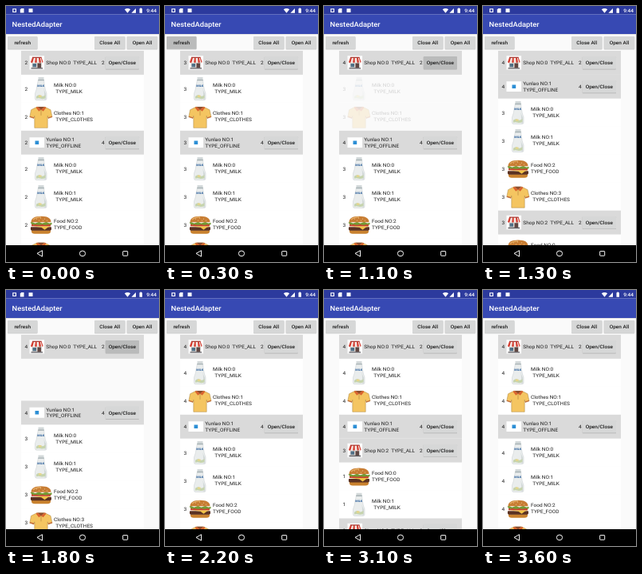
These frames come from a looping animation (192 by 320 pixels, 3700 ms). An HTML page:

```html
<!DOCTYPE html>
<html lang="en">
<head>
<meta charset="utf-8">
<title>NestedAdapter</title>
<style>
html, body { margin: 0; width: 100%; height: 100%; overflow: hidden; background: #fafafa; }
svg { display: block; width: 100%; height: 100%; }
text { font: 6.53px Roboto, sans-serif; fill: #1c1c1c; white-space: pre; text-rendering: geometricPrecision; }
.btn text { font-weight: 500; text-anchor: middle; }
.bar { font-weight: 500; fill: #fff; }
</style>
</head>
<body>
<!-- A 9:16 phone screen shown on a slightly shorter stage. -->
<svg viewBox="0 0 192 341.33" preserveAspectRatio="none" xmlns="http://www.w3.org/2000/svg">
  <defs>
    <clipPath id="view"><rect x="19" y="59.73" width="154" height="260"/></clipPath>
    <g id="shop">
      <path d="M29.500 6.600h18.600v18.600H29.500z" fill="#fcfcfc"/>
      <path d="M32.500 15h12.600v8H32.500z" fill="#d9d5d1"/>
      <path d="M33.500 17h4.500v4.500h-4.500z" fill="#4f6f86"/>
      <path d="M39.500 16.500h4.500V23h-4.500z" fill="#604743"/>
      <path d="M31.500 22.600h14.600V24H31.500z" fill="#5c5b60"/>
      <path d="M33 9h11.600l2 6q-1.300 2.400-2.600 0-1.300 2.400-2.600 0-1.300 2.400-2.600 0-1.300 2.400-2.600 0-1.300 2.400-2.600 0-1.300 2.400-2.600 0z" fill="#f5ebe6"/>
      <path d="M33 9h2l-1.400 6q-1.300 2.400-2.600 0zM37 9h1.600l.2 6q-1.300 2.400-2.600 0zM41 9h1.700l1.300 6q-1.300 2.400-2.600 0zM44.600 9l2 6-1 1-2-7z" fill="#d43d31"/>
      <path d="M33 8.300h11.600v1.300H33z" fill="#a93a33"/>
    </g>
    <g id="brand">
      <path d="M29.500 8.900h18.600v13.800H29.500z" fill="#fff"/>
      <path d="M36.500 13.500h4.700v4.700h-4.700z" fill="#2d8fd5"/>
    </g>
    <g id="milk">
      <path d="M40.500 7h7l.7 6q.8 7 2.800 12v7q0 2-2 2H38.500q-2 0-2-2v-7q2-5 2.800-12z" fill="#eaeded" stroke="#c6cccd" stroke-width=".5"/>
      <path d="M40.500 3.500h7V8h-7z" fill="#d3d9da"/>
      <path d="M40.200 6.500h7.600v1.500h-7.600z" fill="#a9b3b6"/>
      <path d="M47.500 18q.5 4 2.500 7.500V32q0 1.500-1.500 1.500z" fill="#d3d9d9"/>
      <path d="M38 29q3-3 5.500-1t6-1v4q-3 2-6 1T38 32z" fill="#c6d4ae"/>
      <path d="M41 27.500h3.500V30H41z" fill="#e5d68c"/>
      <text x="43.800" y="15.800" text-anchor="middle" style="font-size:3.800px;font-weight:700;fill:#245a98">MILK</text>
    </g>
    <g id="clothes" transform="scale(1 1.067)">
      <path d="M38.500 5.500L31.500 9 29.800 18l5.200 1.600.8-3.100V31.500h16.400V16.500l.8 3.100 5-1.600L56 9 49 5.500z" fill="#f4c561" stroke="#a9823f" stroke-width=".5"/>
      <path d="M30 16.800l5.300 1.500-.3 1.300-5.200-1.600zM57.800 16.800l-4.900 1.500.1 1.300 5-1.600z" fill="#c4683a"/>
      <path d="M39.500 5.200h8.800l-4.300 4.200z" fill="#8d4d2e"/>
      <path d="M39 5l-1.300 1.500 3.600 4.500 2.700-2.300zM49 5l1.300 1.500-3.600 4.500L44 8.700z" fill="#d9632f"/>
      <path d="M44 9v7" stroke="#b58640" stroke-width=".7"/>
    </g>
    <g id="food" transform="scale(1 1.067)">
      <path d="M32 24.500h24v1.500q0 3-4 3H36q-4 0-4-3z" fill="#c9822f"/>
      <path d="M31.200 20.500h25.600q1 4.500-2 4.500H33q-3 0-1.800-4.500z" fill="#5b3222"/>
      <path d="M32 19.500h24.500l-4 1.500-4 3-4-3z" fill="#f0c247"/>
      <path d="M32 16.500h24v3H32z" fill="#c9442f"/>
      <path d="M30.500 15q2-1.500 4 0t4.500 0 4.500 0 4.500 0 4.500 0 5 0q.5 3.500-2 2.800t-4 0-4 0-4 0-4 0-4.500 0-4.500-2.800z" fill="#739a35"/>
      <path d="M31.500 14.500q0-7.500 12.500-7.500T56.500 14.500z" fill="#c87d33"/>
      <path d="M34 11.500Q37 8.500 44 8.300" fill="none" stroke="#e6b067" stroke-width="1.200"/>
      <path d="M38 10.500h1M43 9.500h1M48 10.500h1M41 12.500h1M46 12.500h1M51 12.500h1" stroke="#f3dcab" stroke-width=".7"/>
    </g>
  </defs>
  <rect width="192" height="341.33" fill="#fafafa"/>
  <g id="list" clip-path="url(#view)"></g>
  <g id="top"></g>
  <rect width="192" height="11.200" fill="#2c3a9d"/>
  <rect y="11.200" width="192" height="26.130" fill="#3749b3"/>
  <rect y="37.330" width="192" height=".7" fill="#000" opacity=".12"/>
  <text class="bar" x="7.600" y="27.600" style="font-size:9.330px">NestedAdapter</text>
  <g fill="#fff">
    <path d="M8.800 4h3.600v4H8.800z" fill="none" stroke="#fff" stroke-width="1.200"/>
    <path d="M19.200 3.200h3.300v5.800h-4.700V4.700z"/>
    <rect x="28.500" y="3.500" width="5" height="5"/>
    <path d="M148.800 4.500q3.700-2.600 7.400 0l-3.700 4.700z"/>
    <path d="M163 3.200v6h-5.600z"/>
    <path d="M167.500 3.400h1v-.8h1.500v.8h1v5.800h-3.500z"/>
  </g>
  <text class="bar" x="189" y="8.200" text-anchor="end">9:44</text>
  <rect y="318.930" width="192" height="22.400" fill="#000"/>
  <g fill="none" stroke="#fff" stroke-width="1">
    <path d="M45.500 326v8l-6.500-4z" stroke-linejoin="round"/>
    <circle cx="96" cy="330" r="3.600"/>
    <rect x="146.700" y="327" width="6" height="6" rx=".5"/>
  </g>
</svg>
<script>
const LOOP = 3700, TOP = 59.73, SHOP_H = 31.83, KID_H = 37.33;
const NS = "http://www.w3.org/2000/svg";
const list = document.getElementById("list");

function add(parent, tag, attrs, content) {
  const node = document.createElementNS(NS, tag);
  for (const key in attrs) node.setAttribute(key, attrs[key]);
  if (content !== undefined) node.textContent = content;
  parent.appendChild(node);
  return node;
}

const label = (parent, x, y, content) => add(parent, "text", { x, y }, content);
const ramp = (t, start, length) => Math.min(1, Math.max(0, (t - start) / length));
const ease = p => (1 - Math.cos(Math.PI * p)) / 2;

// Returns the overlay that darkens the button while it is pressed.
function button(parent, x, y, width, content) {
  const g = add(parent, "g", { class: "btn" });
  const box = { x, y, width, height: 16.8, rx: 0.9 };
  add(g, "rect", { ...box, y: y + 0.7, fill: "#000", opacity: 0.2 });
  add(g, "rect", { ...box, fill: "#d6d7d7" });
  const press = add(g, "rect", { ...box, fill: "#000", opacity: 0 });
  add(g, "text", { x: x + width / 2, y: y + 10.8 }, content);
  return press;
}

function makeRow(height, fill, icon, numbers) {
  const g = add(list, "g", {});
  add(g, "rect", { x: 19, width: 154, height, fill });
  add(g, "use", { href: "#" + icon });
  const count = label(g, 23.6, height / 2 + 2.5, "");
  return { g, count, numbers };
}

function makeKid(kind, numbers, i) {
  const row = makeRow(KID_H, "#fff", kind.toLowerCase(), numbers);
  label(row.g, 60, 16.5, `${kind} NO:${i}`);
  label(row.g, kind === "Food" ? 60 : 62.3, 25.2, "TYPE_" + kind.toUpperCase());
  return row;
}

function makeShop(icon, lines, numbers, kinds, kidNumbers) {
  const kids = kinds.map((kind, i) => makeKid(kind, kidNumbers, i));
  const row = makeRow(SHOP_H, "#dadada", icon, numbers);
  const base = lines.length > 1 ? 14.1 : 18.4;
  lines.forEach((line, i) => label(row.g, 50.3, base + i * 8.2, line));
  label(row.g, 119.9, 18.4, kinds.length);
  row.press = button(row.g, 124.8, 7.5, 42.2, "Open/Close");
  return { row, kids };
}

// Numbers are [time of change, value] pairs.
const refreshed = [[0, 2], [250, 3], [450, 4]];
const shops = [
  makeShop("shop", ["Shop NO:0  TYPE_ALL"], refreshed,
    ["Milk", "Clothes"], [[0, 2], [250, 3], [1600, 4]]),
  makeShop("brand", ["Yunlao NO:1", "TYPE_OFFLINE"], refreshed,
    ["Milk", "Milk", "Food", "Clothes"], [[0, 2], [250, 3], [3050, 4]]),
  makeShop("shop", ["Shop NO:2  TYPE_ALL"], [[0, 3]], ["Food", "Milk"], [[0, 1]]),
  makeShop("shop", ["Shop NO:3  TYPE_ALL"], [[0, 2]], ["Milk", "Clothes"], [[0, 1]])
];

const topBar = document.getElementById("top");
const refresh = button(topBar, 2, 40.5, 37.5, "refresh");
button(topBar, 111, 40.5, 38.5, "Close All");
button(topBar, 151.7, 40.5, 38.5, "Open All");

// Rows fade out before the list closes and fade in after it opens.
const toggles = [
  { hide: 1010, close: 1100, closeTime: 190, open: 1634 },
  { hide: 2570, close: 2740, closeTime: 250, open: 3140 }
];

const spread = (t, s) =>
  1 - ease(ramp(t, s.close, s.closeTime)) + ease(ramp(t, s.open, 250));
const shown = (t, s) => 1 - ramp(t, s.hide, 110) + ramp(t, s.open + 250, 120);

function pulse(t, start, end) {
  return 0.13 * ramp(t, start, 70) * (1 - ramp(t, end - 180, 180));
}

function setRow(row, y, alpha, t) {
  row.g.setAttribute("transform", `translate(0 ${y.toFixed(3)})`);
  row.g.setAttribute("opacity", alpha);
  let value, fade = 1;
  for (const [time, n] of row.numbers) {
    if (t >= time) value = n;
    if (time) fade = Math.min(fade, Math.abs(t - time) / 40);
  }
  row.count.textContent = value;
  row.count.setAttribute("opacity", fade);
}

function draw(t) {
  let y = TOP;
  shops.forEach(({ row, kids }, i) => {
    const s = toggles[i];
    setRow(row, y, 1, t);
    y += SHOP_H;
    const alpha = s ? shown(t, s) : 1;
    kids.forEach((kid, k) => setRow(kid, y + k * KID_H, alpha, t));
    y += kids.length * KID_H * (s ? spread(t, s) : 1);
    if (s) {
      const dark = pulse(t, s.hide, s.close + s.closeTime) + pulse(t, s.open, s.open + 420);
      row.press.setAttribute("opacity", dark);
    }
  });
  refresh.setAttribute("opacity", pulse(t, 180, 500));
}

function tick() {
  draw(performance.now() % LOOP);
  requestAnimationFrame(tick);
}
tick();
</script>
</body>
</html>
```
